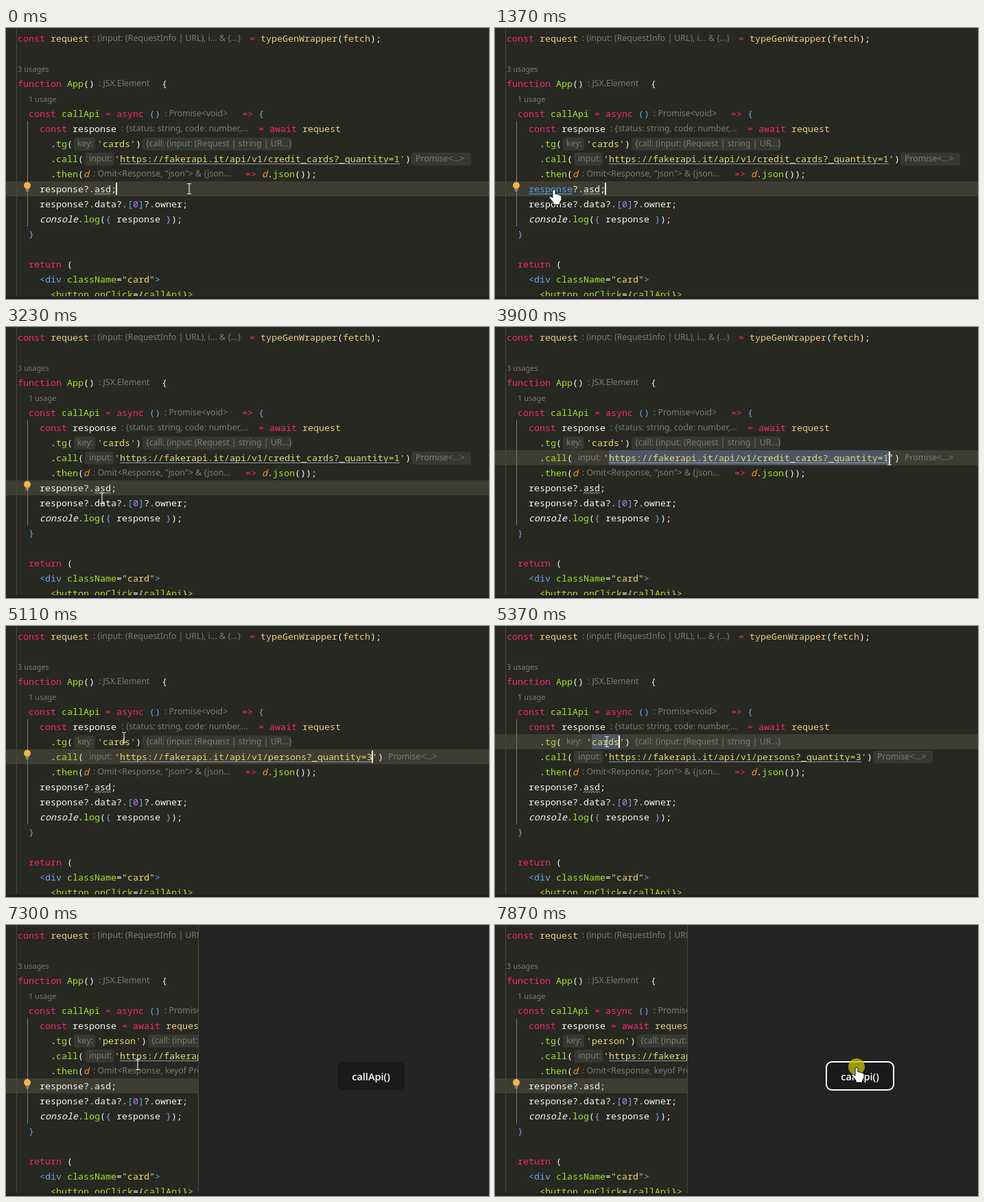
Write an HTML page with a canvas that moves like this. It is 704 px wide and 396 px high and loops after 8000 ms.

```html
<!DOCTYPE html>
<html lang="en">
<head>
<meta charset="utf-8">
<title>Typed API call</title>
<style>
  html, body { margin: 0; width: 100%; height: 100%; overflow: hidden; background: #272822; }
  canvas { display: block; }
</style>
</head>
<body>
<canvas id="stage" width="704" height="396"></canvas>
<script>
const ctx = document.getElementById('stage').getContext('2d');
const LOOP = 8000, CHAR = 8, ROW = 22;
const CODE = '13.333px "Noto Sans Mono", monospace';
const HINT = '12.3px "Noto Sans", sans-serif';

const pink = '#f92672', green = '#a6e22e', peach = '#efcb83', yellow = '#e6db74', white = '#f8f8f2',
  blue = '#6fa8e8', purple = '#ae81ff', orange = '#fd971f', gray = '#7b7c75', link = '#589df6';
const rowColor = '#3e3d32', chip = '#373831';

const baseline = row => 20 + row * ROW;
const between = (t, from, to) => t >= from && t < to;

function text(str, x, y, color, font) {
  ctx.font = font;
  ctx.fillStyle = color;
  ctx.fillText(str, x, y);
}

// Takes colour and text in turn; a leading "~" makes the text italic.
function code(row, x, ...parts) {
  for (let i = 0; i < parts.length; i += 2) {
    const italic = parts[i + 1][0] === '~';
    const str = italic ? parts[i + 1].slice(1) : parts[i + 1];
    text(str, x, baseline(row), parts[i], (italic ? 'italic ' : '') + CODE);
    x += str.length * CHAR;
  }
}

const hint = (row, x, str) => text(str, x, baseline(row) - 1, gray, HINT);

function chipHint(row, x, str, left, right, activeRow) {
  if (row !== activeRow) box(left, baseline(row) - 14, right - left, 19, 4, chip);
  hint(row, x, str);
}

function box(x, y, w, h, r, fill, stroke, lineWidth = 1) {
  ctx.beginPath();
  ctx.roundRect(x, y, w, h, r);
  ctx.fillStyle = fill;
  ctx.fill();
  if (stroke) {
    ctx.strokeStyle = stroke;
    ctx.lineWidth = lineWidth;
    ctx.stroke();
  }
}

function rect(x, y, w, h, color) {
  ctx.fillStyle = color;
  ctx.fillRect(x, y, w, h);
}

function bulb(row) {
  const y = baseline(row) - 10;
  ctx.beginPath();
  ctx.arc(31, y, 5, 0, 7);
  ctx.fillStyle = '#f0b548';
  ctx.fill();
  rect(28.5, y + 3, 5, 2, '#f0b548');
  rect(28.5, y + 6, 5, 1, '#b8b8b0');
  rect(29.5, y + 8, 3, 1, '#b8b8b0');
}

function squiggle(x, y, width) {
  ctx.beginPath();
  for (let i = 0; i <= width; i += 2) ctx.lineTo(x + i, y + (i % 4 ? -1.2 : 1.2));
  ctx.strokeStyle = '#aaa99c';
  ctx.lineWidth = 1;
  ctx.stroke();
}

// Mouse stops: time, x, y.
const stops = [
  [0, 267, 235], [850, 267, 235], [1080, 170, 250], [1370, 86, 236], [2430, 86, 236],
  [2440, 98, 229], [2900, 140, 250], [3230, 140, 250], [3490, 166, 194], [3900, 575, 194],
  [4180, 575, 194], [4710, 290, 188], [4910, 290, 188], [5110, 172, 163], [5200, 163, 169],
  [6240, 163, 169], [6500, 179, 218], [6640, 192, 234], [7300, 192, 204], [7550, 192, 204],
  [7810, 527, 208], [LOOP, 527, 208]
];

function mouseAt(t) {
  const i = stops.findIndex(s => s[0] > t);
  const [t0, x0, y0] = stops[i - 1], [t1, x1, y1] = stops[i];
  const p = (t - t0) / (t1 - t0), e = p * p * (3 - 2 * p);
  return [x0 + (x1 - x0) * e, y0 + (y1 - y0) * e];
}

function beam(x, y) {
  ctx.beginPath();
  ctx.moveTo(x - 3, y - 7.5); ctx.lineTo(x + 3, y - 7.5);
  ctx.moveTo(x, y - 7.5); ctx.lineTo(x, y + 7.5);
  ctx.moveTo(x - 3, y + 7.5); ctx.lineTo(x + 3, y + 7.5);
  ctx.strokeStyle = '#e8e8e2';
  ctx.lineWidth = 1.2;
  ctx.stroke();
}

const handShape = new Path2D(
  'M-2 1Q0-1 2 1V7Q4 5.500 5.500 7.500Q7.500 6.500 8.500 8.500Q11 8 11 10.500V15L8.500 19V22H-1V19L-7 12Q-7 9-4 10.500L-2 12Z');

function hand(x, y) {
  ctx.save();
  ctx.translate(x, y);
  ctx.fillStyle = '#fff';
  ctx.strokeStyle = '#111';
  ctx.lineWidth = 1;
  ctx.fill(handShape);
  ctx.stroke(handShape);
  ctx.restore();
}

function typePopup() {
  box(30.5, 15.5, 169, 206, 3, '#3b3c37', '#595a53');
  const lines = ['const response: {', '  status: string,', '  code: number,', '  total: number,', '  data: {',
    '    type: string,', '    number: string,', '    expiration: string,', '    owner: string', '  }[]', '}'];
  lines.forEach((line, i) => text(line, 38, 35 + i * 18, '#d0d0c8', '11px "Noto Sans Mono", monospace'));
}

function editor(t) {
  const row = t < 3500 ? 10 : t < 5200 ? 8 : t < 6640 ? 7 : 10;
  const key = t < 5840 ? 'cards' : 'person';
  const url = 'https://fakerapi.it/api/v1/' + (t < 4180 ? 'credit_cards?_quantity=1' : 'persons?_quantity=3');
  const valid = t >= 6040;
  const urlEnd = 166 + url.length * CHAR;
  const keyEnd = 141 + key.length * CHAR;

  rect(0, 0, 704, 396, '#272822');
  rect(0, row * ROW + 4, 704, ROW, rowColor);
  rect(15, 0, 1, 392, '#47483f');
  rect(31, 136, 1, 154, '#777870');

  if (between(t, 3500, 4180)) rect(166, 180, Math.max(0, Math.min(urlEnd, mouseAt(t)[0]) - 166), ROW, '#4d5666');
  if (between(t, 5200, 5840)) rect(141, 158, keyEnd - 141, ROW, '#4d5666');

  code(0, 17, pink, 'const ', peach, 'request');
  hint(0, 127, ': (input: (RequestInfo | URL), i... & {...}');
  code(0, 355, pink, '= ', peach, 'typeGenWrapper', white, '(', peach, 'fetch', white, ');');

  text('3 usages', 17, 64, gray, '11px "Noto Sans", sans-serif');
  code(3, 17, pink, 'function ', green, 'App', white, '()');
  hint(3, 135, ': JSX.Element');
  code(3, 227, white, '{');

  text('1 usage', 33, 108, gray, '11px "Noto Sans", sans-serif');
  code(5, 33, pink, 'const ', green, 'callApi ', pink, '= async ', blue, '()');
  hint(5, 231, ': Promise<void>');
  code(5, 344, pink, '=> ', blue, '{');

  code(6, 49, pink, 'const ', white, 'response');
  if (!valid) hint(6, 168, ': {status: string, code: number,...');
  code(6, valid ? 169 : 368, pink, '= await ', peach, 'request');

  code(7, 65, white, '.', green, 'tg', white, '(');
  chipHint(7, 104, 'key:', 99, 130, row);
  code(7, 133, yellow, `'${key}'`, white, ')');
  const callX = keyEnd + 23;
  chipHint(7, callX, '{call: (input: (Request | string | UR...}', callX - 5, callX + 212, row);

  code(8, 65, white, '.', green, 'call', white, '(');
  chipHint(8, 121, 'input:', 115, 157, row);
  code(8, 158, yellow, `'${url}'`, white, ')');
  rect(166, 198, urlEnd - 166, 1, '#8f9daf');
  chipHint(8, urlEnd + 23, 'Promise<...>', urlEnd + 17, urlEnd + 104, row);

  code(9, 65, white, '.', green, 'then', white, '(', orange, '~d');
  hint(9, 127, valid ? ': Omit<Response, keyof Promise<R...' : ': Omit<Response, "json"> & {json...');
  code(9, valid ? 359 : 349, pink, '=> ', orange, '~d', white, '.', green, 'json', white, '());');

  const hovered = between(t, 1300, 2440);
  code(10, 49, hovered ? link : white, 'response', white, '?.asd;');
  if (hovered) rect(49, 242, 64, 1, link);
  if (!valid) squiggle(129, 242.5, 24);

  code(11, 49, white, 'response?.data?.', blue, '[', purple, '0', blue, ']', white, '?.owner;');
  code(12, 49, white, '~console', white, '.', green, 'log', white, '(', blue, '{', white, ' response ', blue, '}', white, ');');
  code(13, 33, blue, '}');
  code(15, 33, pink, 'return ', white, '(');
  code(16, 49, blue, '<div ', green, 'className', white, '=', yellow, '"card"', blue, '>');
  code(17, 65, green, '<button onClick', white, '=', yellow, '{', green, 'callApi', yellow, '}', green, '>');

  const bulbRow = between(t, 320, 850) ? 0 : t < 3500 ? 10
    : between(t, 5100, 5200) ? 8 : between(t, 6240, 6640) ? 7 : t >= 7300 ? 10 : 0;
  if (bulbRow) bulb(bulbRow);

  const caretOff = between(t, 180, 710) || between(t, 1710, 2240) || between(t, 2770, 3500) || t >= 7300;
  const caretX = row === 10 ? 160
    : row === 7 ? keyEnd - 1
    : t < 4180 ? Math.max(166, Math.min(urlEnd, mouseAt(t)[0])) : urlEnd - 1;
  if (!caretOff) rect(caretX, row * ROW + 6, 2, 18, white);

  if (between(t, 1710, 2440)) typePopup();
  rect(0, 392, 704, 4, '#281d22');
}

function browserPanel(t) {
  const focused = t >= 7800;
  rect(280, 0, 424, 392, '#242424');
  rect(280, 0, 1, 392, '#454545');
  box(483, 200, 98, 41, 8, '#1a1a1a', focused ? '#fff' : null, 2);
  ctx.textAlign = 'center';
  text('callApi()', 532, 227, '#fff', '600 14.5px "Open Sans", sans-serif');
  ctx.textAlign = 'left';
}

function draw(t) {
  const [x, y] = mouseAt(t);
  editor(t);
  if (t >= 7300) browserPanel(t);
  if (t >= 7800) {
    ctx.beginPath();
    ctx.arc(527, 207, 12, 0, 7);
    ctx.fillStyle = 'rgba(190, 185, 10, .8)';
    ctx.fill();
  }
  const overButton = t >= 7550 && x > 482;
  if (between(t, 1300, 2440) || overButton) hand(x, y);
  else beam(x, y);
}

const start = performance.now();
function tick() {
  draw((performance.now() - start) % LOOP);
  requestAnimationFrame(tick);
}
draw(0);
requestAnimationFrame(tick);
</script>
</body>
</html>
```
